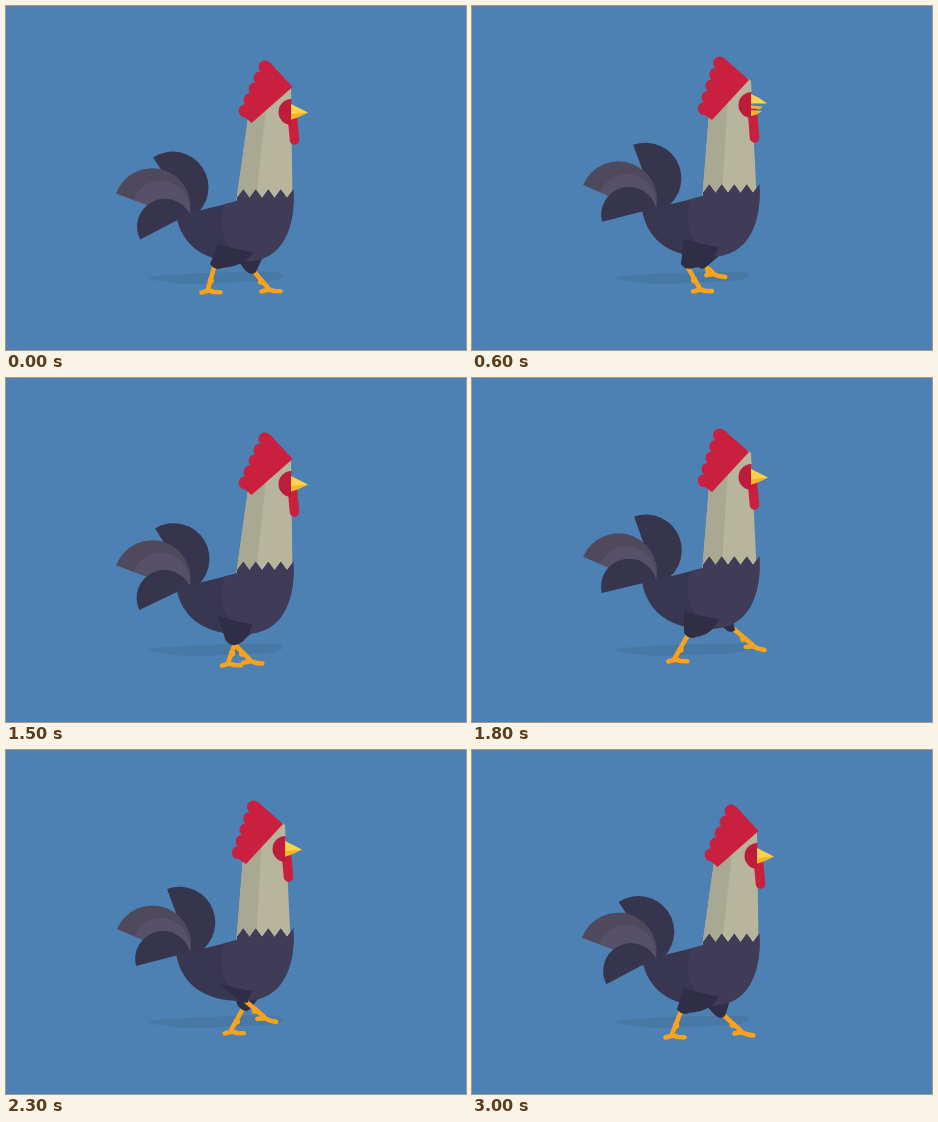
Recreate the animation shown at these times as an HTML page with a canvas. Size 460 px wide and 344 px high, loop 3.1 s.

```html
<!DOCTYPE html>
<html lang="en">
<head>
<meta charset="utf-8">
<title>Walking rooster</title>
<style>
html, body { margin: 0; width: 100%; height: 100%; overflow: hidden; background: #4d81b3; }
canvas { display: block; }
</style>
</head>
<body>
<canvas id="stage" width="460" height="344"></canvas>
<script>
const ctx = document.getElementById('stage').getContext('2d');
const LOOP = 3100, STEP = 100, CYCLE = 1010;

const DARK = '#37354e', BODY = '#393651', LIGHT = '#403c57', THIGH = '#302d47';
const RED = '#c9203f', CRIMSON = '#bd1c3c', ORANGE = '#f9a31c';

// Walk poses: phase, knee x, knee y, foot x, foot y, foot tilt (degrees)
const nearWalk = [
  [0, 209, 262, 205, 286, 0],
  [.09, 208, 255, 222, 279, 3],
  [.28, 236, 252, 261, 270, 10],
  [.47, 226, 266, 250, 284, 7],
  [.5, 223, 266, 243, 285, 0],
  [.59, 214, 262, 231, 285, 0],
  [.78, 217, 259, 206, 283, 0],
  [.97, 210, 263, 203, 287, 0]
];
const farWalk = nearWalk.map(r => r.slice());
farWalk[1] = [.09, 207, 261, 221, 270, 6];

// phase, tail tilt, body drop
const bob = [
  [0, 13, 4], [.09, 5, -2], [.28, 0, -1], [.46, 11, 4], [.5, 10, 4],
  [.59, 0, -1], [.78, -1, -1], [.96, 13, 4]
];

const mod = (x, n) => ((x % n) + n) % n;
const mix = (a, b, k) => a + (b - a) * k;
const ease = k => { k = Math.min(1, Math.max(0, k)); return k * k * (3 - 2 * k); };

// Smooth cyclic interpolation of table rows
function sample(rows, phase) {
  const n = rows.length, p = mod(phase, 1);
  let i = n - 1;
  while (rows[i][0] > p) i--;
  const at = j => rows[mod(j, n)];
  const time = j => at(j)[0] + Math.floor(j / n);
  const span = time(i + 1) - time(i), k = (p - time(i)) / span;
  const slope = (j, c) => (at(j + 1)[c] - at(j - 1)[c]) / (time(j + 1) - time(j - 1)) * span;
  return rows[0].slice(1).map((_, m) => {
    const c = m + 1, k2 = k * k, k3 = k2 * k;
    return (2 * k3 - 3 * k2 + 1) * at(i)[c] + (k3 - 2 * k2 + k) * slope(i, c)
      + (3 * k2 - 2 * k3) * at(i + 1)[c] + (k3 - k2) * slope(i + 1, c);
  });
}

function fill(d, color) {
  ctx.fillStyle = color;
  ctx.fill(new Path2D(d));
}

function stroke(d, color, width) {
  ctx.strokeStyle = color;
  ctx.lineWidth = width;
  ctx.lineCap = ctx.lineJoin = 'round';
  ctx.stroke(new Path2D(d));
}

function group(x, y, deg, px, py, draw) {
  ctx.save();
  ctx.translate(x + px, y + py);
  ctx.rotate(deg * Math.PI / 180);
  ctx.translate(-px, -py);
  draw();
  ctx.restore();
}

function disc(x, y, r, color) {
  ctx.fillStyle = color;
  ctx.beginPath();
  ctx.arc(x, y, r, 0, Math.PI * 2);
  ctx.fill();
}

function leg([kx, ky, fx, fy, tilt]) {
  const a = tilt * Math.PI / 180;
  const ax = fx - 3 * Math.cos(a), ay = fy - 3 - 3 * Math.sin(a);
  stroke(`M${kx} ${ky - 4}L${ax} ${ay}`, ORANGE, 4.6);
  disc(mix(kx, ax, .6), mix(ky, ay, .6), 3.2, ORANGE);
  group(fx, fy, tilt, 0, 0, () => stroke('M-9.5 .5L-2 -1.5L3 0L9.5 .2', ORANGE, 4.6));
}

function shadow() {
  fill('M143 271C160 268 240 265 273 266C284 270 272 276 246 276C215 276 195 280 170 277C157 275 144 275 143 271Z', '#4778a6');
}

// Half disc on the chord from tip to root
function feather(tilt, x, y, rx, ry, color) {
  const r = Math.hypot(rx - x, ry - y) / 2;
  group(0, 0, -tilt, 187, 205, () => fill(`M${x} ${y}A${r} ${r} 0 0 1 ${rx} ${ry}Z`, color));
}

function tail(tilt) {
  feather(tilt, 161, 140, 186, 207, DARK);
  feather(tilt * .2, 111, 180, 182, 210, '#4f495d');
  feather(tilt * .2, 128, 187, 182, 210, '#565068');
  feather(tilt, 130, 217, 184, 203, DARK);
}

// Sawtooth collar between neck and body
const collar = Array.from({ length: 10 }, (_, i) =>
  `${(231 + i * 6.25).toFixed(1)} ${i % 2 ? 179.5 : 188}`).join('L');

function body() {
  fill(`M${collar}C290 218 276 252 238 252C202 253 176 238 170 205Q190 202 231 191Z`, BODY);
  fill(`M${collar}C290 218 276 252 240 251C222 242 209 220 219 194L231 191Z`, LIGHT);
}

function neck(h, drop) {
  const lx = 237 + 5 * h, ly = 108 + 4 * h;
  const rx = 279 + 6 * h, ry = 72 + 7 * h, foot = 190 + drop;
  fill(`M${lx} ${ly}L${rx - 4} ${ry}L${rx} ${ry + 3}L${mix(284.5, 286.5, h)} ${foot}L230.5 ${foot}Z`, '#b7b69d');
  fill(`M${lx} ${ly}L${lx + 19} ${ly - 19}L250 ${foot}L230.5 ${foot}Z`, '#a9a892');
}

function comb() {
  fill('M252 52L277 74L240 114L230 107Z', RED);
  for (let i = 0; i < 5; i++) disc(247.5 - 3.8 * i, 57 + 11.4 * i, 6.5, RED);
}

function face(open) {
  stroke(`M280.5 105L282.5 ${127 + 5 * open}`, RED, 9.5);
  fill('M279.5 86A13 13 0 0 0 279.5 112Z', CRIMSON);
  if (open) {
    fill('M279 88Q287 91 295 97.5L279 97.5Z', '#ffd24d');
    fill('M279 99.5L291 100.5L288 103L279 102.5Z', '#f0b52c');
    fill(`M279 ${102 + 2 * open}L290 ${103 + 2 * open}Q286 109 279 110Z`, '#f0b52c');
  } else {
    fill('M279 91L296 99.5L279 106.5Z', '#ffd24d');
    fill('M279 101L296 99.5Q286 105 279 106.5Z', '#f1b52c');
  }
}

function nearThigh(kx, ky, drop) {
  const top = 234 + drop;
  fill(`M212 ${top}L${kx - 5} ${ky - 4}Q${kx} ${ky + 3} ${kx + 7} ${ky}Q240 ${ky - 2} 247 ${top + 8}Q232 ${top + 6} 212 ${top}Z`, THIGH);
}

function farThigh(kx, ky, drop) {
  const top = 242 + drop;
  fill(`M226 ${top}L${kx - 7} ${ky - 3}Q${kx} ${ky + 5} ${kx + 5} ${ky}L260 ${top - 2}Z`, THIGH);
}

// Head thrust, once for every step
function thrust(phase) {
  const u = mod(phase, .5);
  return u < .1 ? 1 - ease((u - .005) / .065) : ease((u - .31) / .12);
}

function draw(t) {
  const phase = t / CYCLE;
  const near = sample(nearWalk, phase), far = sample(farWalk, phase + .5);
  const [tilt, drop] = sample(bob, phase);
  const h = thrust(phase);
  const open = t > 400 && t < 800 ? 1 - Math.abs(t - 600) / 200 : 0;
  far[0] += 22;
  far[2] += 22;

  ctx.fillStyle = '#4d81b3';
  ctx.fillRect(0, 0, 460, 344);
  shadow();
  leg(far);
  farThigh(far[0], far[1], drop);
  group(0, drop, 0, 0, 0, () => tail(tilt));
  neck(h, drop);
  group(0, drop, 0, 0, 0, body);
  leg(near);
  nearThigh(near[0], near[1], drop);
  group(8 * h, 4.5 * h, 6 * h, 254, 90, comb);
  group(6 * h, 7 * h, 0, 0, 0, () => face(open));
}

function tick() {
  const t = performance.now() % LOOP;
  draw(Math.floor(t / STEP) * STEP);
  requestAnimationFrame(tick);
}
tick();
</script>
</body>
</html>
```
